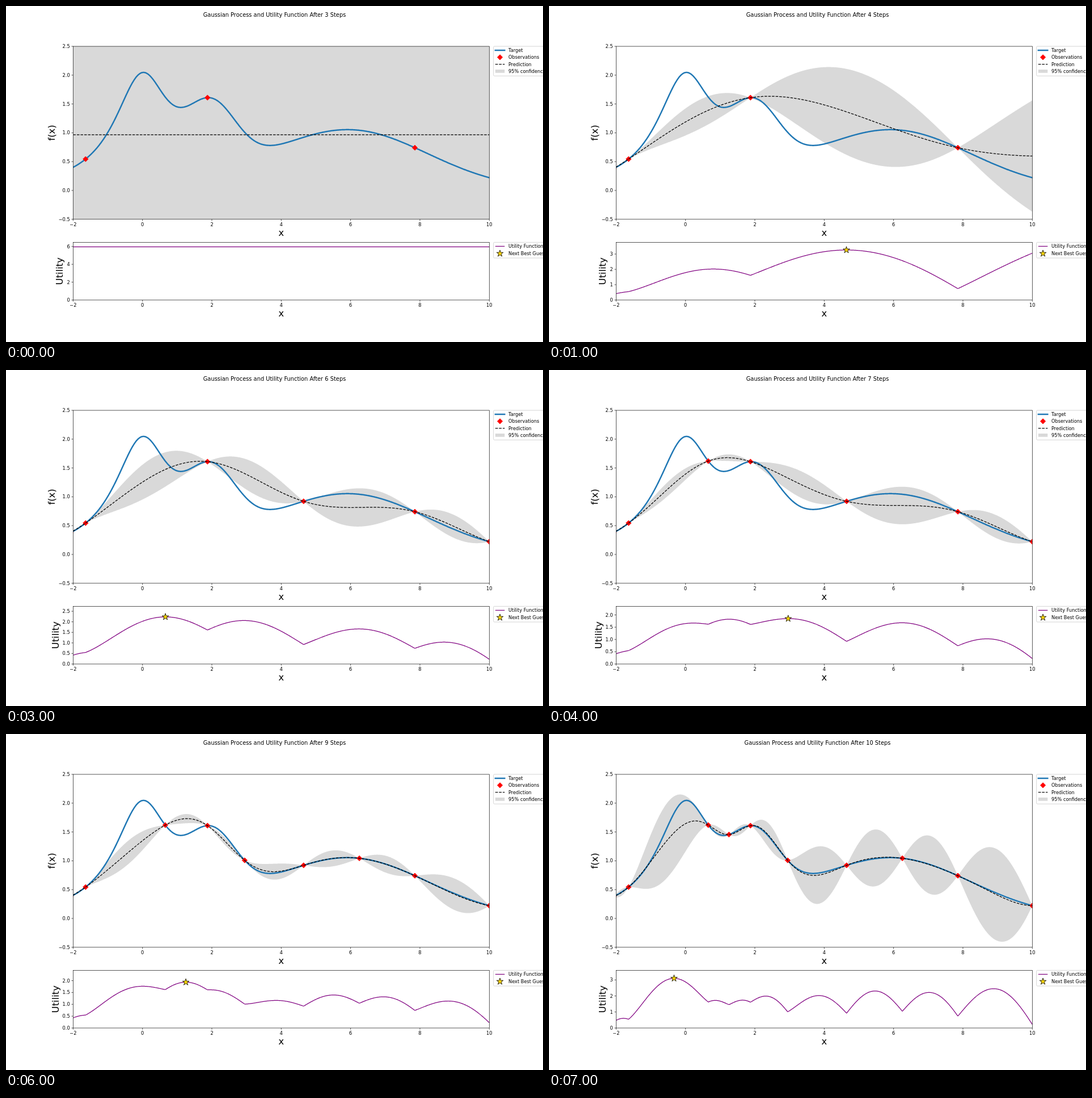
An HTML page that plays this animation: 947 px wide and 592 px high, repeating every 8 s.

```html
<!DOCTYPE html>
<html lang="en">
<head>
<meta charset="utf-8">
<title>Gaussian process steps</title>
<style>
  html, body { margin: 0; width: 100%; height: 100%; overflow: hidden; background: #fff; }
  svg { display: block; width: 947px; height: 592px; }
  text { font-family: "DejaVu Sans", sans-serif; font-size: 8.22px; fill: #000; }
  .big { font-size: 16.44px; text-anchor: middle; }
  .title { font-size: 9.865px; text-anchor: middle; }
  .axis { fill: none; stroke: #000; stroke-width: .66; }
  .line { fill: none; stroke-linejoin: round; stroke-width: 1.233; }
  .target { stroke: #1f77b4; stroke-width: 2.466; stroke-linecap: square; }
  .mean { stroke: #000; stroke-dasharray: 4.56 1.97; }
  .utility { stroke: #800080; }
  .band { fill: #d9d9d9; }
  .dot { fill: #f00; stroke: #f00; stroke-width: .82; }
  .star { fill: #ffd700; stroke: #000; stroke-width: .82; }
  .box { fill: #fff; stroke: #ccc; stroke-width: .82; }
</style>
</head>
<body>
<svg id="stage" viewBox="0 0 947 592"></svg>
<script>
const L = 118.4, R = 852.3;
const TOP = { y0: 71.04, y1: 375.78 };
const LOW = { y0: 416.41, y1: 518 };
const STEP_MS = 1000, FIRST = 3, STEPS = 8, KAPPA = 5, NOISE = 1e-6;

// sampled points in the order they were tried
const tried = [-1.641, 1.8735, 7.8532, -2.07, 4.645, 10, 0.657, 2.947, 6.253, 1.253];
const target = x => Math.exp(-((x - 2) ** 2)) + Math.exp(-((x - 6) ** 2) / 10) + 2 / (x * x + 1);
const grid = Array.from({ length: 1201 }, (_, i) => -2 + i / 100);

const sx = x => L + (x + 2) / 12 * (R - L);
const sy = v => TOP.y1 - (v + 0.5) / 3 * (TOP.y1 - TOP.y0);
const num = v => v.toFixed(2);

// ---- Gaussian process ----
function matern(r, len) {
  const s = Math.sqrt(5) * Math.abs(r) / len;
  return (1 + s + s * s / 3) * Math.exp(-s);
}

function cholesky(xs, len) {
  const C = xs.map(() => []);
  for (let i = 0; i < xs.length; i++) {
    for (let j = 0; j <= i; j++) {
      let v = matern(xs[i] - xs[j], len) + (i === j ? NOISE : 0);
      for (let k = 0; k < j; k++) v -= C[i][k] * C[j][k];
      C[i][j] = i === j ? Math.sqrt(Math.max(v, 1e-12)) : v / C[j][j];
    }
  }
  return C;
}

function solve(C, b) {
  const z = [];
  for (let i = 0; i < b.length; i++) {
    let v = b[i];
    for (let k = 0; k < i; k++) v -= C[i][k] * z[k];
    z.push(v / C[i][i]);
  }
  return z;
}

const dot = (a, b) => a.reduce((sum, v, i) => sum + v * b[i], 0);

// length scale of greatest marginal likelihood
function fitLength(xs, ys) {
  let best = -Infinity, found = 1;
  for (let g = Math.log(1e-5); g < 3; g += 0.02) {
    const len = Math.exp(g), C = cholesky(xs, len), z = solve(C, ys);
    const score = -dot(z, z) / 2 - C.reduce((s, row, i) => s + Math.log(row[i]), 0);
    if (score > best + 1e-9) { best = score; found = len; }
  }
  return found;
}

function model(n) {
  const xs = tried.slice(0, n), raw = xs.map(target);
  const base = raw.reduce((a, b) => a + b) / n;
  const ys = raw.map(y => y - base);
  const len = fitLength(xs, ys), C = cholesky(xs, len), z = solve(C, ys);
  const mean = [], sd = [];
  for (const x of grid) {
    const k = solve(C, xs.map(p => matern(x - p, len)));
    mean.push(base + dot(k, z));
    sd.push(Math.sqrt(Math.max(0, 1 - dot(k, k))));
  }
  const util = mean.map((m, i) => m + KAPPA * sd[i]);
  return { n, xs, mean, sd, util };
}

// ---- drawing helpers ----
const path = (vals, fy) => "M" + vals.map((v, i) => num(sx(grid[i])) + " " + num(fy(v))).join("L");

function polygon(cx, cy, pts) {
  return "M" + pts.map(([a, r]) => num(cx + r * Math.sin(a)) + " " + num(cy - r * Math.cos(a))).join("L") + "Z";
}
const diamond = (x, y) => polygon(x, y, [0, 1, 2, 3].map(i => [i * Math.PI / 2, 4.65]));
const star = (x, y) => polygon(x, y, Array.from({ length: 10 }, (_, i) =>
  [i * Math.PI / 5, i % 2 ? 6.165 * 0.381966 : 6.165]));

const label = (x, y, s, attr = "") => `<text x="${num(x)}" y="${num(y)}" ${attr}>${s}</text>`;
const minus = s => String(s).replace("-", "\u2212");
const rect = (ax, cls) =>
  `<rect class="${cls}" x="${L}" y="${ax.y0}" width="${R - L}" height="${ax.y1 - ax.y0}"/>`;

function xTicks(ax) {
  let out = "";
  for (let v = -2; v <= 10; v += 2) {
    out += `<path class="axis" d="M${num(sx(v))} ${ax.y1}v2.88"/>` +
      label(sx(v), ax.y1 + 12.1, minus(v), 'text-anchor="middle"');
  }
  return out + label((L + R) / 2, ax.y1 + 29.2, "x", 'class="big"');
}

const yTick = (y, s) => `<path class="axis" d="M${L} ${num(y)}h-2.88"/>` +
  label(L - 5.75, y + 3, minus(s), 'text-anchor="end"');

const side = (x, ax, s) => {
  const y = (ax.y0 + ax.y1) / 2;
  return label(x, y, s, `class="big" transform="rotate(-90 ${num(x)} ${num(y)})"`);
};

function legend(ax, rows) {
  const h = rows.length * 12.3 + 3;
  return `<rect class="box" x="859.7" y="${ax.y0}" width="120" height="${h}" rx="1.64"/>` +
    rows.map(([s, draw], i) => {
      const y = ax.y0 + 7 + i * 12.3;
      return draw(y) + label(886, y + 3, s);
    }).join("");
}
const dash = cls => y => `<path class="line ${cls}" d="M862.9 ${num(y)}h16.44"/>`;

// ---- static parts ----
let yTop = "";
for (let v = -0.5; v <= 2.5; v += 0.5) yTop += yTick(sy(v), v.toFixed(1));

document.getElementById("stage").innerHTML = `
  <defs>
    <clipPath id="clipTop">${rect(TOP, "")}</clipPath>
    <clipPath id="clipLow">${rect(LOW, "")}</clipPath>
  </defs>
  <rect width="947" height="592" fill="#fff"/>
  <text id="title" class="title" x="473.5" y="19.4"></text>
  <g clip-path="url(#clipTop)">
    <path id="band" class="band"/>
    <path class="line target" d="${path(grid.map(target), sy)}"/>
    <path id="dots" class="dot"/>
    <path id="mean" class="line mean"/>
  </g>
  ${rect(TOP, "axis")}${xTicks(TOP)}${yTop}${side(85.9, TOP, "f(x)")}
  <g clip-path="url(#clipLow)">
    <path id="util" class="line utility"/>
    <path id="next" class="star"/>
  </g>
  ${rect(LOW, "axis")}${xTicks(LOW)}<g id="scale"></g>
  ${legend(TOP, [
    ["Target", dash("target")],
    ["Observations", y => `<path class="dot" d="${diamond(871.1, y)}"/>`],
    ["Prediction", dash("mean")],
    ["95% confidence interval", y => `<rect class="band" x="862.9" y="${num(y - 2.9)}" width="16.44" height="5.75"/>`]
  ])}
  ${legend(LOW, [
    ["Utility Function", dash("utility")],
    ["Next Best Guess", y => `<path class="star" d="${star(871.1, y + 0.4)}"/>`]
  ])}`;

// ---- changing parts ----
const el = id => document.getElementById(id);
const set = (id, d) => el(id).setAttribute("d", d);
const models = Array.from({ length: STEPS }, (_, i) => model(FIRST + i));

function show(m) {
  const peak = Math.max(...m.util), max = peak + 0.5;
  const uy = v => LOW.y1 - v / max * (LOW.y1 - LOW.y0);
  const edge = k => m.mean.map((v, i) => v + k * m.sd[i]);
  const back = edge(-1.96).map((v, i) => num(sx(grid[i])) + " " + num(sy(v))).reverse();

  el("title").textContent = `Gaussian Process and Utility Function After ${m.n} Steps`;
  set("band", path(edge(1.96), sy) + "L" + back.join("L") + "Z");
  set("dots", m.xs.map(x => diamond(sx(x), sy(target(x)))).join(""));
  set("mean", path(m.mean, sy));
  set("util", path(m.util, uy));
  // a flat utility has no best guess in view
  set("next", m.n > FIRST ? star(sx(grid[m.util.indexOf(peak)]), uy(peak)) : "");

  const step = max > 6 ? 2 : max > 3 ? 1 : 0.5;
  let ticks = "";
  for (let v = 0; v <= max; v += step) ticks += yTick(uy(v), v.toFixed(step < 1 ? 1 : 0));
  el("scale").innerHTML = ticks + side(step < 1 ? 92.6 : 100.4, LOW, "Utility");
}

let shown = -1;
const start = performance.now();
function tick() {
  const i = Math.floor((performance.now() - start) / STEP_MS) % STEPS;
  if (i !== shown) show(models[shown = i]);
  requestAnimationFrame(tick);
}
tick();
</script>
</body>
</html>
```
